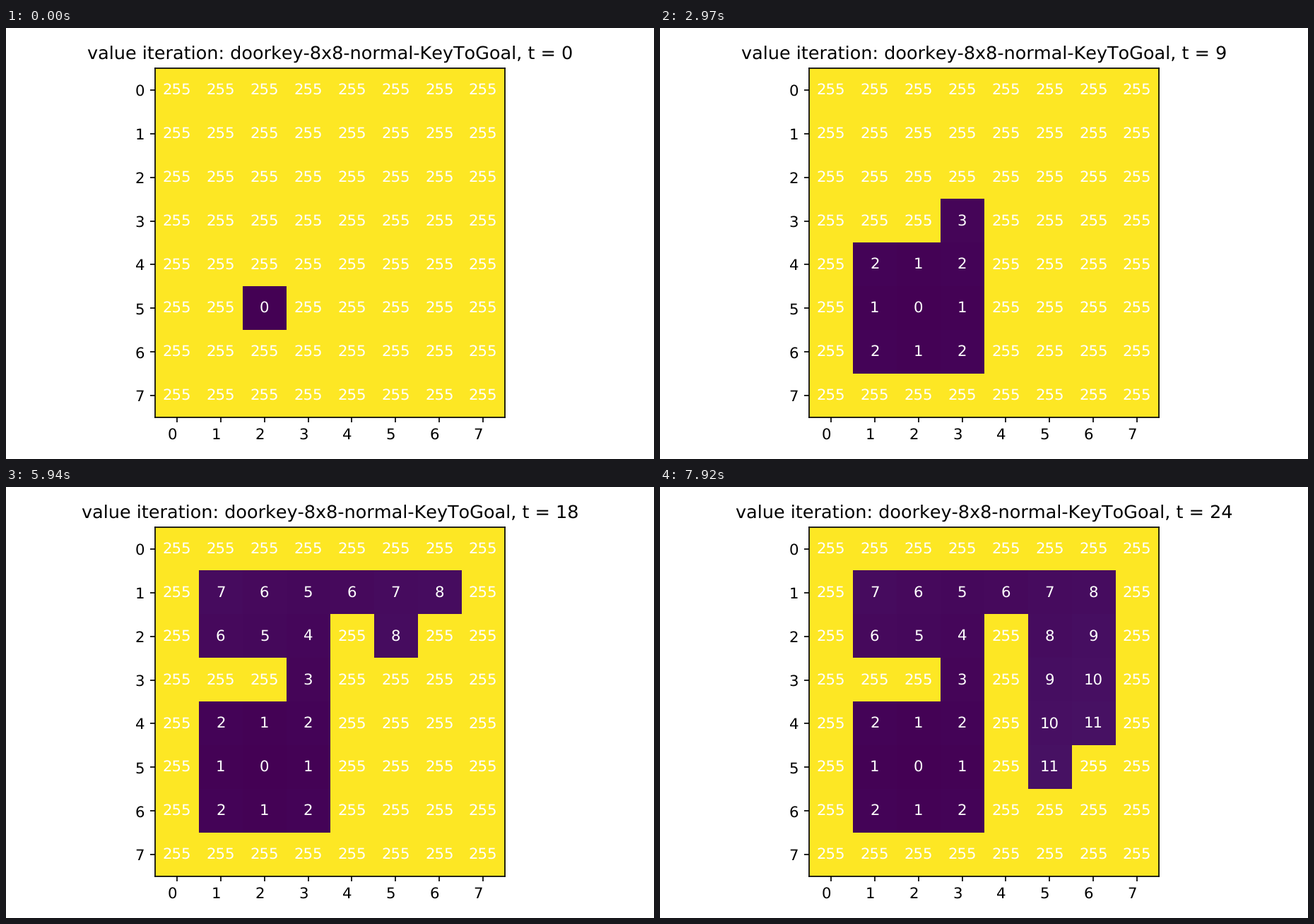
A matplotlib script that plays this animation: 917x611 px, repeating every 8000 ms.

```python
from collections import deque

import numpy as np
import matplotlib.pyplot as plt
from matplotlib.animation import FuncAnimation

W, H, DPI = 917, 611, 152.8
LOOP, TICK, STEP = 8000, 40, 330
N, FAR = 8, 255
GOAL = (5, 2)
MOVES = [(0, 1), (1, 0), (0, -1), (-1, 0)]  # right, down, left, up


def make_walls():
    walls = np.zeros((N, N), bool)
    walls[[0, -1], :] = walls[:, [0, -1]] = True
    walls[3, 1:3] = True   # shelf below the upper left room
    walls[2:, 4] = True    # divider, open in row 1
    return walls


def search(steps):
    """Breadth-first distances, one snapshot per expanded cell."""
    walls = make_walls()
    dist = np.full((N, N), FAR)
    dist[GOAL] = 0
    queue = deque([GOAL])
    shots = [dist.copy()]
    for _ in range(steps):
        r, c = queue.popleft()
        for dr, dc in MOVES:
            cell = r + dr, c + dc
            if not walls[cell] and dist[cell] == FAR:
                dist[cell] = dist[r, c] + 1
                queue.append(cell)
        shots.append(dist.copy())
    return shots


shots = search(LOOP // STEP)

plt.rcParams.update({
    "font.family": "DejaVu Sans",
    "text.kerning_factor": 6,   # loose spacing, kerning pairs barely tightened
    "text.hinting": "none",
})
fig = plt.figure(figsize=((W + 1e-3) / DPI, (H + 1e-3) / DPI), dpi=DPI,
                 facecolor="white")

side, cx, cy = 495.2, 458.5, 304.5
ax = fig.add_axes([(cx - side / 2) / W, 1 - (cy + side / 2) / H,
                   side / W, side / H])
image = ax.imshow(shots[0], cmap="viridis", vmin=0, vmax=FAR,
                  aspect="auto", interpolation="nearest")
ax.set_xticks(range(N))
ax.set_yticks(range(N))
plt.setp(ax.get_xticklabels(), ha="right")
title = ax.set_title("", fontsize=12)
labels = [ax.text(c, r, "", color="w", fontsize=10, ha="center", va="center")
          for r in range(N) for c in range(N)]


def show(t):
    image.set_data(shots[t])
    title.set_text(f"value iteration: doorkey-8x8-normal-KeyToGoal, t = {t}")
    for label, value in zip(labels, shots[t].flat):
        label.set_text(str(value))
    return [image, title, *labels]


def update(i):
    return show(((i + 1) * TICK - 1) // STEP)


anim = FuncAnimation(fig, update, frames=LOOP // TICK, interval=TICK,
                     init_func=lambda: show(0), repeat=True, repeat_delay=0)
plt.show()
```
